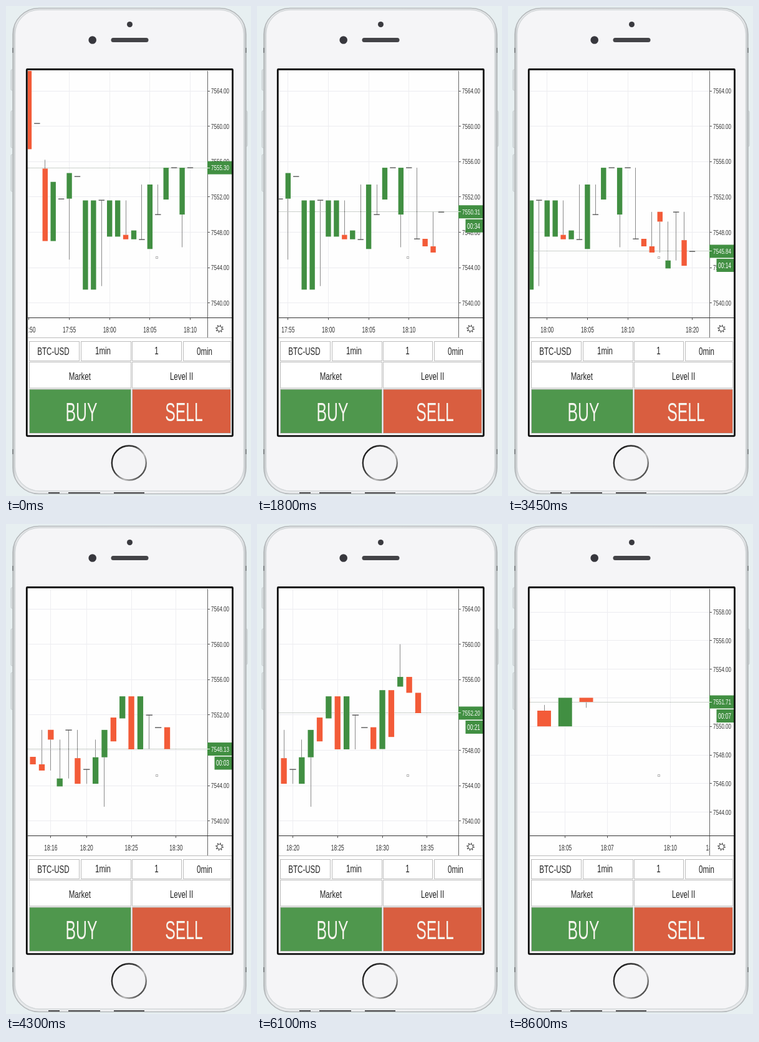
Animation of 393x785 px, one loop 8650 ms. Source, as an HTML page with a canvas:

```html
<!DOCTYPE html>
<html lang="en">
<head>
<meta charset="utf-8">
<title>Trading app</title>
<style>
  html, body { margin: 0; width: 100%; height: 100%; overflow: hidden; background: #e7eff1; }
  svg, canvas { position: absolute; display: block; }
  svg { left: 0; top: 0; }
  canvas { left: 34px; top: 104px; }
  text { font-family: "Liberation Sans", Arial, sans-serif; text-anchor: middle; }
  .box { fill: #fff; stroke: #bdbdbd; }
  .label { font-size: 17px; fill: #222; }
  .big { font-size: 42px; fill: #f6f5ee; }
</style>
</head>
<body>
<svg width="393" height="785" viewBox="0 0 393 785">
  <defs>
    <linearGradient id="rim">
      <stop offset="0" stop-color="#b9bdc0"/><stop offset=".014" stop-color="#e6e8ea"/>
      <stop offset=".5" stop-color="#f4f4f6"/>
      <stop offset=".986" stop-color="#e6e8ea"/><stop offset="1" stop-color="#b9bdc0"/>
    </linearGradient>
    <linearGradient id="ring" x1="0" y1=".1" x2="1" y2=".9">
      <stop offset="0" stop-color="#111"/><stop offset=".4" stop-color="#444"/>
      <stop offset=".65" stop-color="#bbb"/><stop offset="1" stop-color="#222"/>
    </linearGradient>
  </defs>

  <g fill="#dde2e4" stroke="#b9bfc2" stroke-width=".8">
    <rect x="8" y="102" width="4" height="33" rx="1.5"/>
    <rect x="8" y="168" width="4" height="59" rx="1.5"/>
    <rect x="8" y="238" width="4" height="59" rx="1.5"/>
    <rect x="383" y="168" width="4" height="57" rx="1.5"/>
  </g>
  <rect x="11" y="3.5" width="374" height="778" rx="42" fill="url(#rim)" stroke="#b4b8ba" stroke-width="1.6"/>
  <rect x="14.5" y="6" width="367" height="771" rx="39" fill="#f5f5f7" stroke="#d3d7d9" stroke-width="1.4"/>
  <path d="M11 67v8M385 67v8M11 710v8M385 710v8" stroke="#85898b" stroke-width="2"/>
  <path d="M68 780h18M100 780h51M173 780h49" stroke="#4a4a4c" stroke-width="1.8"/>

  <circle cx="198.5" cy="29.5" r="4.5" fill="#3a3a3f"/>
  <circle cx="138.7" cy="54.5" r="6.3" fill="#37373d"/>
  <rect x="168.5" y="51" width="60" height="7" rx="3.5" fill="#434347"/>
  <circle cx="197.3" cy="732" r="27.5" fill="#f4f4f6" stroke="url(#ring)" stroke-width="2.4"/>

  <rect x="34" y="102" width="330" height="587" fill="#fefefe"/>
  <path d="M35 531.5h327" stroke="#bbb"/>
  <g class="box">
    <rect x="37.5" y="537.5" width="80" height="31"/>
    <rect x="120.5" y="537.5" width="80" height="31"/>
    <rect x="202.5" y="537.5" width="79" height="31"/>
    <rect x="284.5" y="537.5" width="76" height="31"/>
    <rect x="37.5" y="570.5" width="163" height="41.5"/>
    <rect x="202.5" y="570.5" width="158" height="41.5"/>
    <rect x="37.5" y="614" width="163" height="70.5" style="fill:#4f974d"/>
    <rect x="202.5" y="614" width="158" height="70.5" style="fill:#d95e40"/>
  </g>
  <g class="label">
    <text transform="translate(76 559) scale(.68 1)">BTC-USD</text>
    <text transform="translate(155.5 558) scale(.68 1)">1min</text>
    <text transform="translate(241.5 558) scale(.68 1)">1</text>
    <text transform="translate(318.5 559) scale(.68 1)">0min</text>
    <text transform="translate(118.3 599) scale(.68 1)">Market</text>
    <text transform="translate(281.5 599) scale(.68 1)">Level II</text>
  </g>
  <g class="big">
    <text transform="translate(121 664.5) scale(.59 1)">BUY</text>
    <text transform="translate(285.5 664.5) scale(.59 1)">SELL</text>
  </g>
</svg>

<canvas id="chart" width="330" height="427"></canvas>

<svg width="393" height="785" viewBox="0 0 393 785" fill="none">
  <g stroke="#444">
    <circle cx="342.5" cy="517" r="4"/>
    <circle cx="342.5" cy="517" r="5.4" stroke-width="1.8" stroke-dasharray="1.6 2.64"/>
  </g>
  <rect x="33.3" y="101.5" width="330.2" height="587.3" rx="1" stroke="#0c0c0c" stroke-width="2.8"/>
</svg>

<script>
const LOOP = 8650, STEP = 50, BASE = 7500;
const GREEN = '#418f42', RED = '#f35b38';
const ctx = document.getElementById('chart').getContext('2d');

// Builds candles along the price path; prices are above BASE.
function series(build) {
  const list = [];
  let last = 0;
  const bar = (open, close, wick) => {
    list.push({ open, close, wick });
    last = close;
  };
  build({
    bar,
    dash: (p, wick) => bar(p, p, wick),
    to: (p, wick) => bar(last, p, wick),             // opens at the last close
    back: (open, close = open) => bar(open, close, last) // wick reaches the last close
  });
  return list;
}

const day = series(({ bar, dash, to, back }) => {
  bar(68, 57.4); dash(60.3);
  bar(55.2, 47, 56.2); to(53.7); dash(51.8); to(54.7, 44.9); dash(54.3);
  for (let i = 0; i < 2; i++) bar(41.5, 51.6);
  dash(51.6, 41.9);
  for (let i = 0; i < 2; i++) bar(47.5, 51.6);
  back(47.7, 47.2); to(48.2); dash(47.2, 53.4);
  bar(46.1, 53.4); back(50); bar(51.7, 55.3); to(55.3); bar(50, 55.3, 46.3);
  to(55.3); back(47.25); to(46.4); to(45.7, 50.3);
  back(50.31, 49.2); back(43.9, 44.8); back(50.3); back(47.1, 44.2); back(45.84);
  bar(44.2, 47.2, 49.2); to(50.3, 41.6); bar(51.7, 49); bar(51.6, 54.1);
  to(48.1); to(54.1); dash(52, 48.1); dash(50.6); to(48.13);
  to(54.8); to(49.5); bar(55.2, 56.3, 60); to(54.5); to(52.2);
});
const replay = series(({ bar, dash, to }) => {
  bar(46.2, 50.5, 44.7); to(51.99); to(51.99); to(51.1);
  to(50, 51.5); to(52); to(51.71, 51.3);
});

// keys: [time, candles opened so far]; the fraction is the age of the live one.
const wide = {
  candles: day, top: 64, y: 136, scale: 14.15, step: 4,
  minute: i => i + (i < 24 ? 50 : 52), marked: m => m % 5 === 0
};
const close = {
  candles: replay, top: 62, y: 123, scale: 18.75, step: 2, gap: 33.75, liveX: 125.5, minLive: 2,
  minute: i => i + 60, marked: m => m % 5 === 0 || m % 5 === 2,
  keys: [[7250, 2.925], [8600, 6.89]]
};
const scenes = [
  { ...wide, end: 3850, gap: 12.93, liveX: 295.5, keys: [[0, 20], [1800, 24.44], [3450, 28.775]] },
  { ...wide, end: 6150, gap: 14.36, liveX: 258.5, keys: [[4300, 37.955], [5200, 40.305]],
    marked: m => m % 5 === 0 || m === 76 },
  { ...close, end: 7900 },
  { ...close, end: LOOP, top: 58, y: 141, scale: 22.9 }
];

// Straight lines through the keys, extended at both ends.
function progress(keys, t) {
  let k = 0;
  while (k < keys.length - 2 && t > keys[k + 1][0]) k++;
  const [[t0, p0], [t1, p1]] = keys.slice(k);
  return Math.max(0, p0 + (p1 - p0) * (t - t0) / (t1 - t0));
}

function line(x1, y1, x2, y2, color, dash = []) {
  ctx.strokeStyle = color;
  ctx.setLineDash(dash);
  ctx.beginPath();
  ctx.moveTo(x1, y1);
  ctx.lineTo(x2, y2);
  ctx.stroke();
}

function box(x, y, w, h, color) {
  ctx.fillStyle = color;
  ctx.fillRect(x, y, w, h);
}

function label(str, x, y, size, color = '#333') {
  ctx.save();
  ctx.translate(x, y);
  ctx.scale(.7, 1);
  ctx.font = `${size}px "Liberation Sans", Arial, sans-serif`;
  ctx.textAlign = 'center';
  ctx.fillStyle = color;
  ctx.fillText(str, 0, size * .36);
  ctx.restore();
}

function clipTo(x, y, w, h, paint) {
  ctx.save();
  ctx.beginPath();
  ctx.rect(x, y, w, h);
  ctx.clip();
  paint();
  ctx.restore();
}

const crisp = v => Math.floor(v) + .5;

function drawCandle(x, w, { open, close, wick }, yOf) {
  const high = Math.max(open, close), a = yOf(high), b = yOf(Math.min(open, close));
  if (wick !== undefined) line(crisp(x), wick > high ? a : b, crisp(x), yOf(wick), '#8b8b8b');
  if (b - a < 1.5) box(x - w / 2 - .5, Math.round(a) - .5, w + 1, 1.3, '#4c4c4c');
  else box(x - w / 2, a, w, b - a, close > open ? GREEN : RED);
}

// The live candle opens, touches its wick end at its own moment, then settles.
function liveCandle(candle, i, age) {
  const { open, close, wick = (open + close) / 2 } = candle;
  const moment = (i * .5208 + .22) % 1;
  if (age < moment) return { open, close: open };
  if (age < moment + .15) return { open, close: wick };
  return candle;
}

function draw(t) {
  const s = scenes.find(v => t < v.end);
  const p = progress(s.keys, t);
  const live = Math.min(Math.floor(p), s.candles.length - 1);
  const age = p - live;
  const anchor = Math.max(live, s.minLive || 0);
  const xOf = i => s.liveX + (i - anchor) * s.gap;
  const yOf = v => s.y + (s.top - v) * s.scale;
  const now = liveCandle(s.candles[live], live, age);
  const py = yOf(now.close);

  ctx.setTransform(1, 0, 0, 1, -34, -104);
  ctx.lineWidth = 1;
  box(34, 104, 330, 427, '#fefefe');

  const prices = [], marks = [];
  for (let v = s.top; yOf(v) < 506; v -= s.step) prices.push(v);
  for (let i = 0; xOf(i) < 345; i++) if (s.marked(s.minute(i))) marks.push(i);

  clipTo(35, 104, 288, 395, () => {
    for (const v of prices) line(35, crisp(yOf(v)), 323, crisp(yOf(v)), '#ececf0');
    for (const i of marks) line(crisp(xOf(i)), 104, crisp(xOf(i)), 499, '#eeeef1');
    line(35, crisp(py), 323, crisp(py), '#9aa59a', [1, 1]);
    ctx.setLineDash([]);
    for (let i = 0; i <= live; i++) {
      drawCandle(xOf(i), s.gap * .65, i < live ? s.candles[i] : now, yOf);
    }
    ctx.strokeStyle = '#b5b5b5';
    ctx.strokeRect(240.5, 401.5, 3, 3);
  });

  clipTo(323, 104, 40, 394, () => {
    for (const v of prices) {
      line(323, crisp(yOf(v)), 327, crisp(yOf(v)), '#555');
      label((BASE + v).toFixed(2), 343.5, yOf(v), 11.5);
    }
  });
  clipTo(35, 500, 288, 31, () => {
    for (const i of marks) {
      const m = s.minute(i);
      line(crisp(xOf(i)), 500, crisp(xOf(i)), 503, '#555');
      label(`${17 + Math.floor(m / 60)}:${String(m % 60).padStart(2, '0')}`, xOf(i), 518.5, 12);
    }
  });
  line(323.5, 104, 323.5, 531, '#666');
  line(35, 499.5, 363, 499.5, '#333');

  box(323, py - 10.5, 40, 21, GREEN);
  line(323, crisp(py), 327, crisp(py), '#e6f0e6');
  label((BASE + now.close).toFixed(2), 343.5, py, 11.5, '#fff');
  const left = Math.max(0, Math.ceil(60 * (1 - age)));
  if (left < 56) {
    box(334.5, py + 12, 28.5, 21, GREEN);
    label('00:' + String(left).padStart(2, '0'), 347.5, py + 22.5, 12, '#fff');
  }
}

const begin = performance.now();
function tick() {
  const t = (performance.now() - begin) % LOOP;
  draw(Math.floor(t / STEP) * STEP);
  requestAnimationFrame(tick);
}
tick();
</script>
</body>
</html>
```
